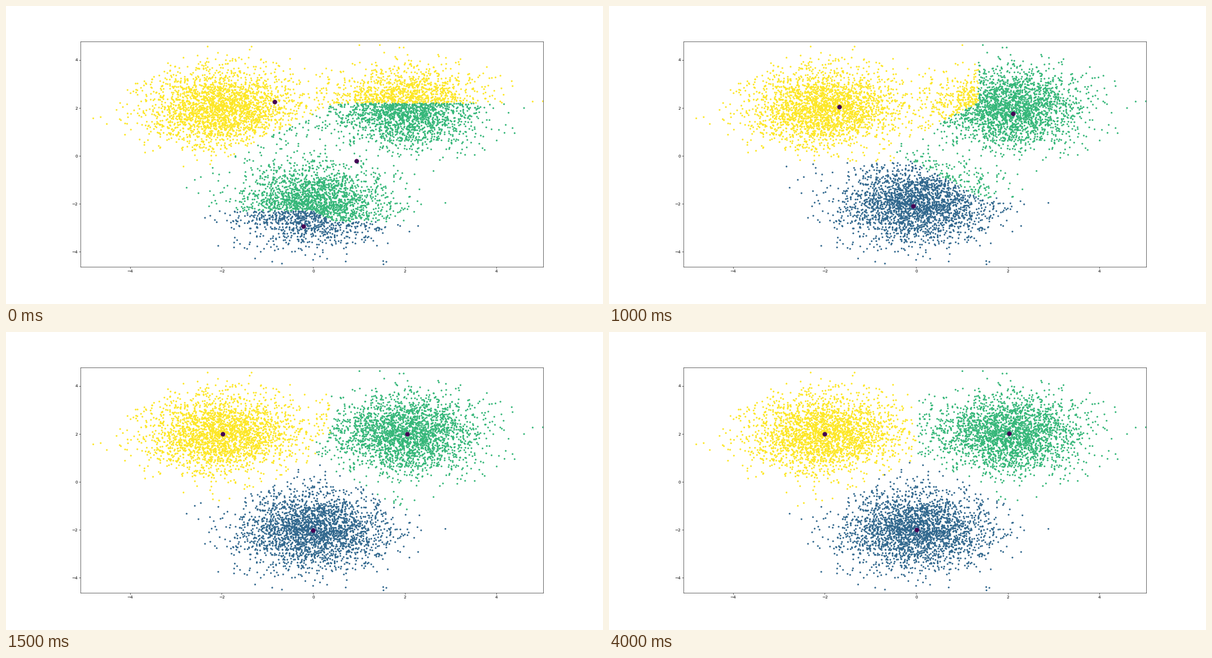
These frames come from a looping animation (1058 px wide and 529 px high, 5 s). A matplotlib script:

```python
import numpy as np
import matplotlib.pyplot as plt
from matplotlib.animation import FuncAnimation

FRAMES, INTERVAL = 10, 500
STEPS = 6
PER_BLOB, SIGMA = 2500, 0.8
BLOBS = [(-2, 2.01), (2.02, 2.01), (0, -2)]
START = [(-2.5, 2.65), (0.45, -1.2), (0, -3.85)]
# Viridis levels: yellow, green, blue; 0 is left for the means
LEVELS = np.array([3, 2, 1])


def blob(rng, center):
    """Normal cloud with exact mean and spread."""
    z = rng.standard_normal((PER_BLOB, 2))
    return (z - z.mean(axis=0)) / z.std(axis=0) * SIGMA + center


def k_means(points, centers, steps):
    """Yield (group of each point, new means) per step, by Manhattan distance."""
    centers = np.array(centers, float)
    for _ in range(steps):
        dist = np.abs(points[:, None] - centers).sum(axis=2)
        group = dist.argmin(axis=1)
        centers = np.array([points[group == k].mean(axis=0)
                            for k in range(len(centers))])
        yield group, centers


rng = np.random.default_rng(7)
points = np.vstack([blob(rng, c) for c in BLOBS])
history = list(k_means(points, START, STEPS))

fig = plt.figure(figsize=(20, 10), dpi=52.9, facecolor="white")
ax = fig.add_axes([0.125, 0.125, 0.775, 0.755])
ax.set_xlim(-5.082, 5.026)
ax.set_ylim(-4.622, 4.763)
ax.set_xticks(range(-4, 5, 2))
ax.set_yticks(range(-4, 5, 2))

dots = ax.scatter(*points.T, c=LEVELS[history[0][0]], s=10,
                  cmap="viridis", vmin=0, vmax=3)
means = ax.scatter(*history[0][1].T, s=100, color="#440154", zorder=2)


def draw(i):
    group, centers = history[min(i, STEPS - 1)]
    dots.set_array(LEVELS[group])
    means.set_offsets(centers)
    return dots, means


anim = FuncAnimation(fig, draw, frames=FRAMES, interval=INTERVAL,
                     repeat=True, repeat_delay=0)
plt.show()
```
